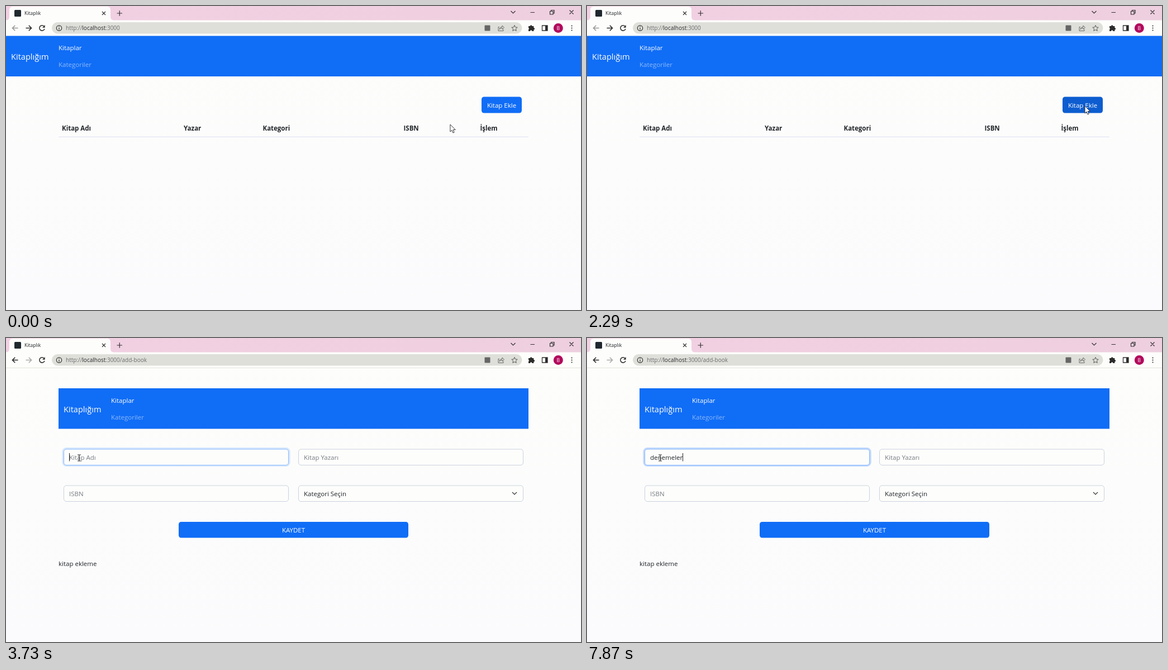
Animation, 1029 px wide and 544 px high, one loop 8000 ms. Source, as an HTML page:

```html
<!DOCTYPE html>
<html lang="tr">
<head>
<meta charset="utf-8">
<title>Kitaplık</title>
<style>
  html, body { margin: 0; width: 100%; height: 100%; overflow: hidden; background: #fdfdfc; }
  svg { display: block; width: 1029px; height: 544px; }
  text { font: 11.5px "Open Sans", "Noto Sans", sans-serif; fill: #212529; white-space: pre; }
  .brand { font-size: 14.6px; fill: #fff; }
  .on { fill: #fff; }
  .off { fill: #8db9fb; }
  .head { font-weight: 700; }
  .hint { fill: #777c81; }
  .mid { text-anchor: middle; }
  .url { font-size: 10px; fill: #6b6c6d; }
  .url tspan { fill: #27282a; }
  .line { fill: none; stroke: #333; stroke-width: 1.2; }
  .nav { fill: none; stroke-width: 1.6; }
  .box { fill: #fdfdfc; stroke: #c9d3de; }
  .blue { fill: #106df6; }
</style>
</head>
<body>
<svg viewBox="0 0 1029 544">
  <defs>
    <linearGradient id="page" x2="0" y2="1">
      <stop stop-color="#fdfdfb"/><stop offset="1" stop-color="#fbfbfd"/>
    </linearGradient>
    <linearGradient id="strip">
      <stop stop-color="#f2d0e3"/><stop offset="1" stop-color="#eecfdf"/>
    </linearGradient>
    <g id="menu">
      <rect class="blue" width="100%" height="72.5"/>
      <text class="brand" x="9" y="42.5">Kitaplığım</text>
      <text class="on" x="94" y="25.5">Kitaplar</text>
      <text class="off" x="94" y="55.5">Kategoriler</text>
    </g>
    <clipPath id="menuClip"><rect width="841" height="73"/></clipPath>
  </defs>

  <rect width="1029" height="544" fill="url(#page)"/>

  <g id="list">
    <use href="#menu" y="53.5"/>
    <rect id="add" x="851" y="162.5" width="72" height="29" rx="4.5"/>
    <text class="on mid" x="887" y="181.5">Kitap Ekle</text>
    <g id="heads"></g>
    <path d="M94 234.2H935" stroke="#dddff2"/>
  </g>

  <g id="form">
    <path d="M0 53.5H1029" stroke="#e3e3dc"/>
    <g transform="translate(94 90)" clip-path="url(#menuClip)"><use href="#menu"/></g>
    <rect id="ring" x="102" y="197.5" width="405" height="31" rx="6" fill="none" stroke="#0d6efd" stroke-width="3.2"/>
    <rect id="field" class="box" x="103.5" y="199" width="402" height="28.5" rx="4.5"/>
    <rect class="box" x="523.5" y="199" width="402" height="28.5" rx="4.5"/>
    <rect class="box" x="103.5" y="264" width="402" height="28.5" rx="4.5"/>
    <rect class="box" x="523.5" y="264" width="402" height="28.5" rx="4.5"/>
    <text id="hint" class="hint" x="113" y="217.5">Kitap Adı</text>
    <text id="typed" x="113" y="217.5"></text>
    <rect id="caret" y="206" width="1" height="14.5" fill="#222"/>
    <text class="hint" x="533" y="217.5">Kitap Yazarı</text>
    <text class="hint" x="113" y="282.5">ISBN</text>
    <text x="533" y="282.5">Kategori Seçin</text>
    <path class="line" d="M906 276l4 4 4-4" stroke-width="1.5"/>
    <rect class="blue" x="309" y="329" width="411" height="28.5" rx="4.5"/>
    <text class="on mid" x="514.5" y="347.5">KAYDET</text>
    <text x="94" y="407.5">kitap ekleme</text>
  </g>

  <g id="browser">
    <rect width="1029" height="26" fill="url(#strip)"/>
    <path d="M0 25.5Q6 25.5 6 19V7Q6 1 12 1H181Q187 1 187 7V19Q187 25.5 193 25.5H1029V53H0Z" fill="#fdfdfb"/>
    <rect x="15" y="7" width="12" height="12" rx="1.5" fill="#20282f"/>
    <text x="33" y="16" style="font-size:8.6px">Kitaplık</text>
    <path class="line" d="M172 10l6 6m0-6l-6 6M198.5 13h9.5m-4.75-4.75v9.5" stroke-width="1.4"/>
    <path class="line" d="M903.5 9l4 4 4-4M938.5 11.5h7.5M973.5 9.5h5.5v5.5h-5.5zM975.5 9V7.5h5.500v5.500H979.500M1008.500 7.500l7 7m0-7l-7 7" stroke-width="1"/>
    <path id="back" class="nav" d="M21.5 39.500H11.500m4.700-4.700l-4.700 4.700 4.700 4.700"/>
    <path id="next" class="nav" d="M35.500 39.500h10m-4.700-4.700l4.700 4.700-4.700 4.700"/>
    <path class="nav" d="M68 36.200a4.700 4.700 0 1 0 1 4.800" stroke="#333"/>
    <path d="M69.700 34v4.700H65z" fill="#333"/>
    <rect x="82" y="29" width="841.500" height="20.500" rx="10.250" fill="#dfdfda"/>
    <circle class="line" cx="95" cy="39.500" r="4.700" stroke-width="1"/>
    <path class="line" d="M95 39v3.300M95 36.500v1.200"/>
    <text class="url" x="107" y="43">http://<tspan>localhost</tspan>:3000<tspan id="path" style="fill:#6b6c6d">/add-book</tspan></text>
    <rect x="856.500" y="34.500" width="10" height="10" rx="1" fill="#666"/>
    <path class="line" d="M883 37.500h-2v7h9v-3M883 42q.5-4.500 5-4.500v-2.500l3.500 3.500-3.500 3.300v-2.500q-3 0-5 2.700z" style="stroke:#666;stroke-width:1"/>
    <path class="line" d="M910 34.500l1.500 3.400 3.700.4-2.800 2.500.8 3.700-3.200-1.900-3.200 1.900.8-3.700-2.800-2.500 3.700-.4z" style="stroke:#555;stroke-width:1"/>
    <path d="M935 36h3a1.700 1.700 0 1 1 3.400 0h3v3a1.700 1.700 0 1 1 0 3.400v2.600h-3a1.700 1.700 0 0 0-3.400 0h-3v-3a1.700 1.700 0 0 0 0-3z" fill="#2b2b2b"/>
    <path class="line" d="M959.500 35h9.500v9h-9.500z" style="stroke-width:1.300"/>
    <path d="M965 35h4v9h-4z" fill="#2b2b2b"/>
    <circle cx="988.300" cy="39.500" r="8.500" fill="#b2085c"/>
    <text class="on mid" x="988.300" y="42.700" style="font-size:8.500px">B</text>
    <path d="M1012.500 35.500v.01m0 3.990v.01m0 3.990v.01" stroke="#333" stroke-width="2.200" stroke-linecap="round"/>
  </g>

  <path id="arrow" d="M0 0V13L3 10.200 5 15 7.200 14.100 5.200 9.400H9.300Z" fill="#fff" stroke="#222" stroke-width=".9"/>
  <path id="beam" class="line" d="M-3-5.500h2Q0-5.500 0-4.500 0-5.500 1-5.500h2M0-4.500v9M-3 5.500h2Q0 5.500 0 4.500 0 5.500 1 5.500h2"/>
</svg>
<script>
const LOOP = 8000, OPEN = 2340, FOCUS = 3460, BLINK = 530;
const $ = id => document.getElementById(id);
const clamp = v => Math.max(0, Math.min(1, v));
const show = (id, on) => { $(id).style.display = on ? '' : 'none'; };

// time, x, y of the pointer
const PATH = [
  [0, 795, 212], [350, 772, 217], [800, 735, 222], [1230, 712, 231], [1450, 722, 231],
  [1720, 785, 212], [1950, 858, 188], [2150, 889, 180], [2290, 891, 179], [OPEN, 891, 179],
  [2450, 790, 193], [2610, 565, 214], [2800, 370, 222], [3050, 210, 220], [3410, 131, 214.5]
];
// time, text after the key press
const KEYS = [
  [FOCUS, ''], [4420, 'd'], [4470, 'de'], [4520, 'den'], [5530, 'dene'], [5640, 'denem'],
  [5960, 'deneme'], [7020, 'denemel'], [7130, 'denemele'], [7870, 'denemeler']
];
const HEADS = [['Kitap Adı', 100], ['Yazar', 318], ['Kategori', 459.5], ['ISBN', 711.5], ['İşlem', 848.5]];
$('heads').innerHTML = HEADS.map(([s, x]) => `<text class="head" x="${x}" y="223">${s}</text>`).join('');

function pointer(t) {
  const i = PATH.findIndex(p => p[0] > t);
  if (i < 0) return PATH[PATH.length - 1].slice(1);
  const [t0, x0, y0] = PATH[i - 1], [t1, x1, y1] = PATH[i];
  const k = (t - t0) / (t1 - t0);
  return [x0 + (x1 - x0) * k, y0 + (y1 - y0) * k];
}

const mix = (a, b, k) => `rgb(${a.map((v, i) => Math.round(v + (b[i] - v) * k))})`;

function drawPointer(t, form) {
  const [x, y] = pointer(t);
  const overField = form && y > 199 && y < 227.5 && (x > 103 && x < 506 || x > 523 && x < 926);
  show('arrow', !overField);
  show('beam', overField);
  $(overField ? 'beam' : 'arrow').setAttribute('transform', `translate(${x} ${y})`);
}

function drawField(t) {
  const focus = 0.65 * clamp((t - FOCUS) / 250) + 0.35 * clamp((t - 3940) / 150);
  $('ring').style.opacity = 0.25 * focus;
  $('field').style.stroke = mix([201, 211, 222], [134, 183, 254], clamp(focus * 1.5));

  const key = KEYS.filter(k => k[0] <= t).pop();
  const text = key ? key[1] : '';
  show('hint', !text);
  $('typed').textContent = text;
  show('caret', key && Math.floor((t - key[0]) / BLINK) % 2 === 0);
  const end = text ? $('typed').getComputedTextLength() : 0;
  $('caret').setAttribute('x', Math.round(113 + end));
}

function draw(t) {
  const form = t >= OPEN;
  show('list', !form);
  show('form', form);
  show('path', form);
  $('back').style.stroke = form ? '#2b2b2b' : '#999';
  $('next').style.stroke = form ? '#aaa' : '#2b2b2b';
  $('add').style.fill = mix([16, 109, 246], [13, 93, 208], clamp((t - 1930) / 150));
  if (form) drawField(t);
  drawPointer(t, form);
}

function tick() {
  draw(performance.now() % LOOP);
  requestAnimationFrame(tick);
}
tick();
</script>
</body>
</html>
```
